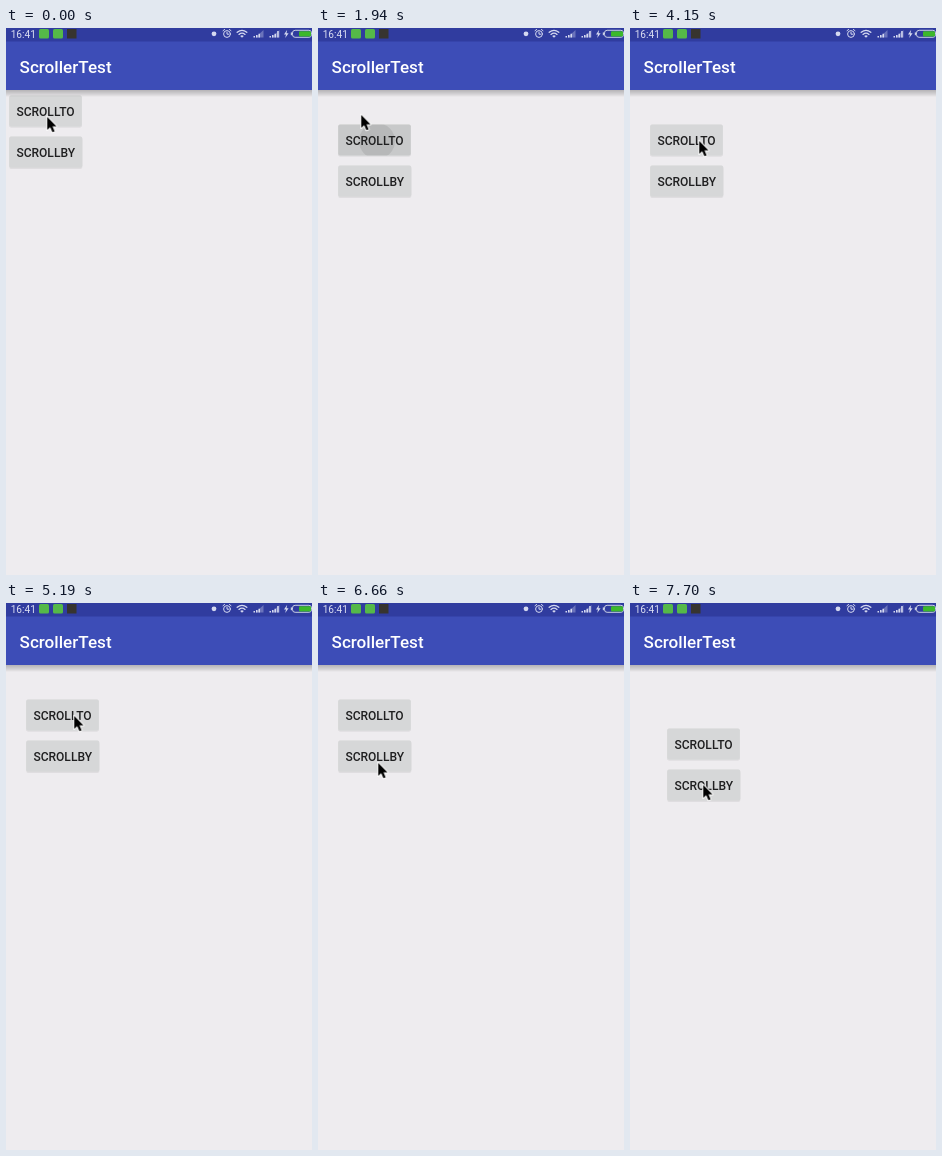
Animation, 306 px wide and 547 px high, one loop 8000 ms. Source, as an HTML page:

```html
<!DOCTYPE html>
<html lang="en">
<head>
<meta charset="utf-8">
<title>ScrollerTest</title>
<style>
html, body { margin: 0; height: 100%; overflow: hidden; background: #eeecef; }
svg { display: block; width: 100vw; height: 100vh; font-family: Roboto, sans-serif; }
.label { font-size: 12.05px; font-weight: 500; fill: #1f1f20; }

.anim { animation: 8s step-end infinite; }
#panel { animation-name: scroll; }
#pointer { animation-name: move; }
#spot { animation-name: touch; }
#ripple { animation-name: ripple; }
#tintTo { animation-name: tintTo; }
#tintBy { animation-name: tintBy; }

@keyframes scroll {
  0% { transform: translate(0, 0); }
  24.25% { transform: translate(17px, 29px); }
  87%, 100% { transform: translate(34px, 58px); }
}
@keyframes move {
  0% { transform: translate(41px, 88px); }
  18.75% { transform: translate(43px, 86px); }
  33.5% { transform: translate(47px, 91px); }
  35.375% { transform: translate(54px, 100px); }
  39% { transform: translate(55px, 109px); }
  40.875% { transform: translate(55px, 113px); }
  48.25% { transform: translate(78px, 112px); }
  50.125% { transform: translate(90px, 112px); }
  51.875% { transform: translate(69px, 112px); }
  59.25% { transform: translate(68px, 112px); }
  74.25% { transform: translate(82px, 121px); }
  76% { transform: translate(95px, 136px); }
  77.875% { transform: translate(82px, 149px); }
  79.75% { transform: translate(67px, 157px); }
  81.375% { transform: translate(61px, 160px); }
  83.25% { transform: translate(60px, 159px); }
  92.5% { transform: translate(65px, 168px); }
  94.375% { transform: translate(71px, 178px); }
  96.25%, 100% { transform: translate(73px, 181px); }
}
@keyframes touch {
  0%, 24.25%, 44.5%, 61.125%, 70.5%, 87%, 100% { opacity: 0; }
  22.375%, 42.75%, 59.25%, 68.625%, 85.125% { opacity: 1; }
}
@keyframes ripple {
  0%, 27.875%, 48.25%, 64.875%, 74.25%, 90.75%, 100% { opacity: 0; }
  24.25% { opacity: .085; transform: translate(42px, 84px) scale(18); }
  26.125% { opacity: .04; transform: translate(41px, 84px) scale(29); }
  44.5% { opacity: .085; transform: translate(39px, 84px) scale(18); }
  46.375% { opacity: .04; transform: translate(39px, 84px) scale(29); }
  61.125% { opacity: .085; transform: translate(49px, 84px) scale(18); }
  63% { opacity: .04; transform: translate(46px, 84px) scale(29); }
  70.5% { opacity: .085; transform: translate(49px, 84px) scale(18); }
  72.375% { opacity: .04; transform: translate(46px, 84px) scale(29); }
  87% { opacity: .085; transform: translate(43px, 127px) scale(18); }
  88.875% { opacity: .04; transform: translate(42px, 126px) scale(26); }
}
@keyframes tintTo {
  0%, 27.875%, 48.25%, 64.875%, 74.25%, 100% { opacity: 0; }
  22.375%, 42.75%, 59.25%, 68.625% { opacity: .025; }
  24.25%, 44.5%, 61.125%, 70.5% { opacity: .06; }
  26.125%, 46.375%, 63%, 72.375% { opacity: .03; }
}
@keyframes tintBy {
  0%, 90.75%, 100% { opacity: 0; }
  85.125% { opacity: .025; }
  87% { opacity: .06; }
  88.875% { opacity: .03; }
}
</style>
</head>
<body>
<svg viewBox="0 0 306 547" preserveAspectRatio="none">
  <defs>
    <rect id="btnTo" x="3.2" y="67.4" width="72.6" height="31.2" rx="1.8"/>
    <rect id="btnBy" x="3.2" y="108.6" width="73.1" height="31.2" rx="1.8"/>
    <clipPath id="buttons"><use href="#btnTo"/><use href="#btnBy"/></clipPath>
    <filter id="lift" x="-10%" y="-20%" width="120%" height="150%">
      <feDropShadow dx="0" dy=".6" stdDeviation=".7" flood-opacity=".14"/>
    </filter>
    <linearGradient id="shade" x2="0" y2="1">
      <stop offset="0" stop-opacity=".24"/>
      <stop offset=".55" stop-opacity=".12"/>
      <stop offset="1" stop-opacity="0"/>
    </linearGradient>
    <path id="signal" d="M0 9.5 L8 2 V9.5Z"/>
    <path id="bars" d="M0 9.5 V8 H1.5 V9.5Z M2.5 9.5 V7 H4 V9.5Z M5 9.5 V5.7 H6.5 V9.5Z"/>
  </defs>

  <rect width="306" height="547" fill="#eeecef"/>

  <g id="panel" class="anim">
    <g fill="#d6d7d8" filter="url(#lift)"><use href="#btnTo"/><use href="#btnBy"/></g>
    <use id="tintTo" class="anim" href="#btnTo"/>
    <use id="tintBy" class="anim" href="#btnBy"/>
    <g clip-path="url(#buttons)"><circle id="ripple" class="anim" r="1"/></g>
    <text class="label" x="10.4" y="87.7">SCROLLTO</text>
    <text class="label" x="10.4" y="128.9">SCROLLBY</text>
  </g>

  <!-- app bar -->
  <rect y="62" width="306" height="7" fill="url(#shade)"/>
  <rect y="13" width="306" height="49" fill="#3d4db7"/>
  <text x="13.6" y="45" font-size="17.1" font-weight="500" fill="#fff">ScrollerTest</text>

  <!-- status bar -->
  <rect width="306" height="13.5" fill="#303c9f"/>
  <text x="4.7" y="9.6" font-size="10.1" fill="#dcdff2">16:41</text>
  <g fill="#55b948">
    <rect x="33" y="1" width="10" height="9.5" rx="1.5"/>
    <rect x="47" y="1" width="10" height="9.5" rx="1.5"/>
  </g>
  <rect x="61" y="1" width="9.5" height="9.5" fill="#37342f"/>
  <circle cx="208" cy="5.8" r="2.4" fill="#d5d9f0"/>
  <g fill="none" stroke="#d5d9f0" stroke-linecap="round">
    <circle cx="221" cy="6" r="3.4"/>
    <path d="M221 4.2 V6.2 H222.6 M217 2.7 L218.6 1.5 M225 2.7 L223.4 1.5"/>
    <path d="M231.2 4.3 Q236 .3 240.8 4.3 M233 6.4 Q236 3.9 239 6.4" stroke-width="1.3"/>
  </g>
  <path d="M234.2 7.9 Q236 6.6 237.8 7.9 L236 9.8Z" fill="#d5d9f0"/>
  <g fill="#d5d9f0">
    <g opacity=".35"><use href="#signal" x="249.5"/><use href="#signal" x="265.5"/></g>
    <use href="#bars" x="247.5"/>
    <use href="#bars" x="263.5"/>
    <path d="M271.2 9.5 V3 H272.7 V9.5Z"/>
    <path d="M281.2 1.8 L278 6.4 H280 L279.2 10 L282.6 5.2 H280.5Z"/>
  </g>
  <rect x="286.5" y="2.3" width="19" height="7" rx="2.6" fill="none" stroke="#c9cfe4"/>
  <rect x="293" y="3.2" width="12" height="5.2" rx="1" fill="#3cb82a"/>
  <rect x="284.8" y="4.4" width="1.4" height="2.8" fill="#c9cfe4"/>

  <g id="pointer" class="anim">
    <circle id="spot" class="anim" cx="1" cy=".8" r="14.6" fill="#555" fill-opacity=".42" stroke="#555" stroke-opacity=".35"/>
    <path transform="translate(.2 .8) scale(.93)" d="M0 0 V14 L3.2 11.1 L5.6 16.6 L8 15.6 L5.7 10.3 H10Z" fill="#000" stroke="#fff" stroke-width="2" stroke-linejoin="round" paint-order="stroke"/>
  </g>
</svg>
</body>
</html>
```
